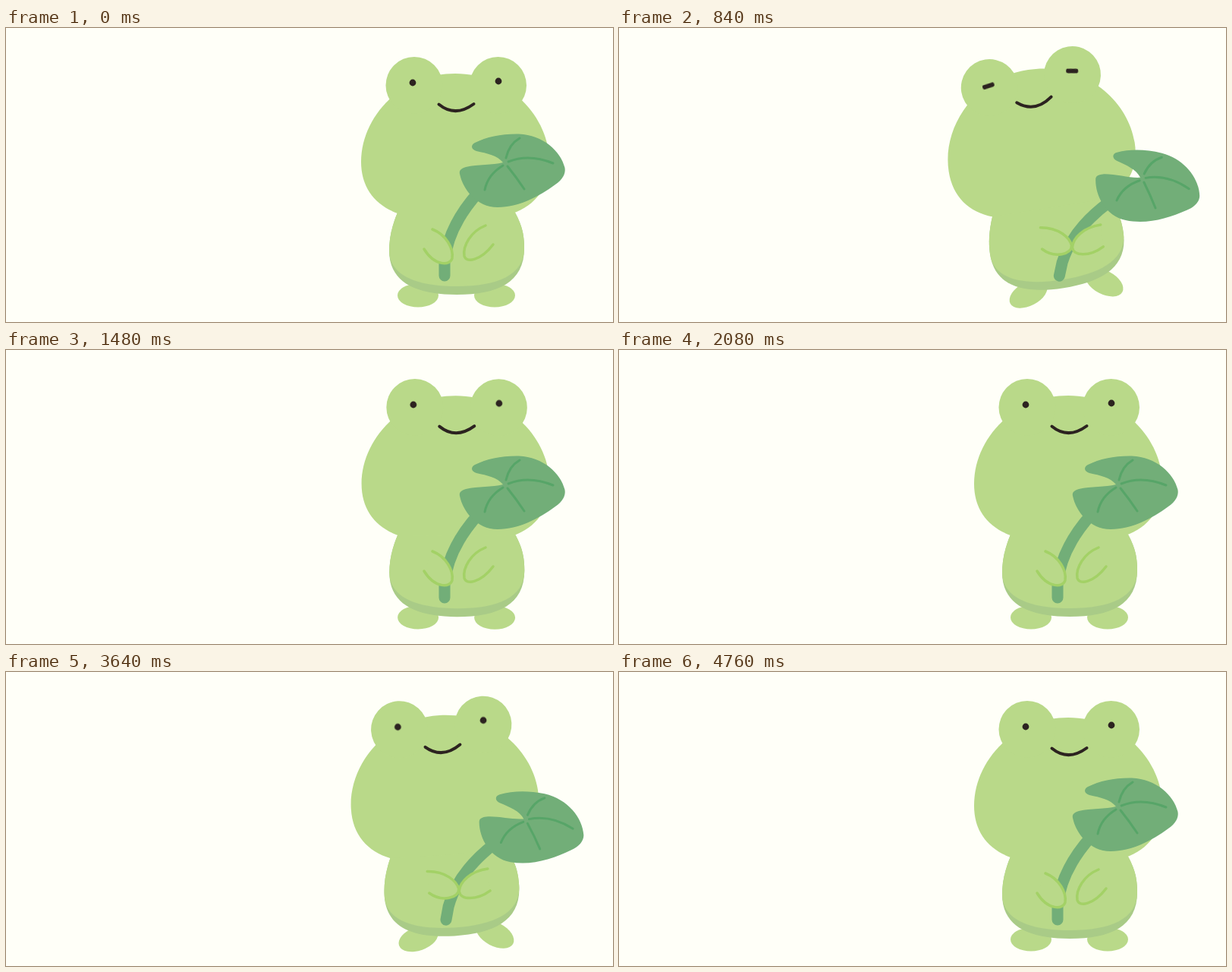
These frames come from a looping animation (800 by 387 pixels, 6 s). An HTML page:

```html
<!DOCTYPE html>
<html lang="en">
<head>
<meta charset="utf-8">
<title>Frog with a leaf</title>
<style>
  @property --tilt { syntax: "<number>"; inherits: true; initial-value: 0; }
  @property --swing { syntax: "<number>"; inherits: true; initial-value: 0; }

  html, body { margin: 0; width: 100%; height: 100%; overflow: hidden; background: #fffff8; }

  svg {
    display: block; width: 100%; height: 100%;
    animation: tilt 6s ease-in-out infinite, swing 6s ease-in-out infinite;
  }

  .frog { transform-origin: 533px 398px; transform: rotate(calc(var(--tilt) * 1deg)); }
  .leaf { transform-origin: 578px 337px; transform: rotate(calc(var(--swing) * 12.3deg)); }
  .foot { transform: translateX(calc(var(--swing) * 4px)) rotate(calc(var(--swing) * var(--turn))); }
  .foot.l { transform-origin: 542px 352px; --turn: -19deg; }
  .foot.r { transform-origin: 644px 352px; --turn: 37deg; }

  .skin { fill: #b9d989; }
  .shade { fill: #a9cb87; }
  .ink { fill: #2c2320; }
  .line { fill: none; stroke-linecap: round; }
  .mouth { stroke: #2c2320; stroke-width: 4; }
  .green { fill: #72ae78; }
  .stem { stroke: #72ae78; stroke-width: 15; }
  .vein { stroke: #57a568; stroke-width: 3; }
  .arm { fill: #b9d989; stroke: #a3d166; stroke-width: 3.5; stroke-linecap: round; }

  .arm.l { animation: arm-l 6s ease-in-out infinite; }
  .arm.r { animation: arm-r 6s ease-in-out infinite; }
  .shut { opacity: 0; animation: blink 6s step-end infinite; }
  .open { animation: stare 6s step-end infinite; }

  /* the swings back use a sharper curve than the default ease-in-out */
  @keyframes tilt {
    0%, .67% { --tilt: 0; }
    11.33% { --tilt: -10; }
    12% { --tilt: -10; animation-timing-function: cubic-bezier(.65, 0, .35, 1); }
    19.33% { --tilt: 2.7; }
    24.67% { --tilt: .15; }
    28.67%, 48.33% { --tilt: 0; }
    59% { --tilt: -3.75; animation-timing-function: cubic-bezier(.65, 0, .35, 1); }
    67% { --tilt: 2.7; }
    72.67% { --tilt: .15; }
    79.33%, 100% { --tilt: 0; }
  }
  @keyframes swing {
    0%, .67% { --swing: 0; }
    11.33% { --swing: 1.05; }
    12% { --swing: 1.05; animation-timing-function: cubic-bezier(.65, 0, .35, 1); }
    20.67% { --swing: .05; }
    24.67%, 48.67% { --swing: 0; }
    59% { --swing: .86; animation-timing-function: cubic-bezier(.65, 0, .35, 1); }
    69.33% { --swing: .05; }
    73.33%, 100% { --swing: 0; }
  }
  @keyframes arm-l {
    0%, .67%, 20.67%, 48.67%, 69.33%, 100% {
      d: path("M562 265C580 272 590 290 588 303C586 313 565 314 551 291");
    }
    11.33%, 12%, 59% {
      d: path("M555 262.5C580 262 594 275 597 285C598 297 575 303 558 291");
      animation-timing-function: cubic-bezier(.65, 0, .35, 1);
    }
  }
  @keyframes arm-r {
    0%, .67%, 20.67%, 48.67%, 69.33%, 100% {
      d: path("M632 260C612 268 602 287 604 300C606 310 626 306 642 285");
    }
    11.33%, 12%, 59% {
      d: path("M635 259C612 262 598 276 597 288C598 300 620 301 638 288");
      animation-timing-function: cubic-bezier(.65, 0, .35, 1);
    }
  }
  @keyframes blink {
    0%, 15.333%, 34.667%, 100% { opacity: 0; }
    13.333%, 32.667% { opacity: 1; }
  }
  @keyframes stare {
    0%, 15.333%, 34.667%, 100% { opacity: 1; }
    13.333%, 32.667% { opacity: 0; }
  }
</style>
</head>
<body>
<svg viewBox="0 0 800 387" preserveAspectRatio="none">
  <g class="frog">
    <ellipse class="skin foot l" cx="543" cy="352" rx="27" ry="15.5"/>
    <ellipse class="skin foot r" cx="644" cy="352" rx="27" ry="15.5"/>
    <path class="shade" d="M516 243C508 262 505 278 505 293C505 335 540 351 594 351C648 351 683 335 683 290C683 270 679 258 671 243Z"/>
    <path class="skin" d="M516 243C508 262 505 278 505 293C505 325 540 340 594 340C648 340 683 325 683 290C683 270 679 258 671 243Z"/>
    <path class="skin" d="M592 60C520 60 468 118 468 176C468 210 486 233 516 244L668 244C698 233 716 210 716 176C716 118 664 60 592 60Z"/>
    <circle class="skin" cx="538" cy="75.5" r="37.5"/>
    <circle class="skin" cx="648.5" cy="75.5" r="37.5"/>
    <g class="ink open">
      <circle cx="536" cy="72" r="4.4"/>
      <circle cx="649" cy="70" r="4.4"/>
    </g>
    <g class="ink shut">
      <rect x="529" y="70" width="16" height="6" rx="2.4" transform="rotate(-9 537 73)"/>
      <rect x="641" y="67.5" width="16" height="6" rx="2.4" transform="rotate(9 649 70.5)"/>
    </g>
    <path class="line mouth" d="M570.5 100.5Q592 118 616.5 100"/>
  </g>
  <g class="leaf">
    <path class="line stem" d="M578 326V308Q582 262 622 217"/>
    <path class="green" d="M655 177C648 168 634 165 620 162C613 160 612 154 618 151C634 143 654 139 676 139.500C708 141 731 162 736.500 184C738 192 733 200 724 206C702 222 676 236 648 236C620 236 602 212 598 192C597 187 600 185 606 183C622 179 641 181 655 177Z"/>
    <g class="line vein">
      <path d="M659 171Q663 153 677 145"/>
      <path d="M662 176Q689 165 721 178"/>
      <path d="M661 182Q673 197 683 212"/>
      <path d="M655 181Q635 193 631 213"/>
    </g>
  </g>
  <path class="arm l" d="M562 265C580 272 590 290 588 303C586 313 565 314 551 291"/>
  <path class="arm r" d="M632 260C612 268 602 287 604 300C606 310 626 306 642 285"/>
</svg>
</body>
</html>
```
